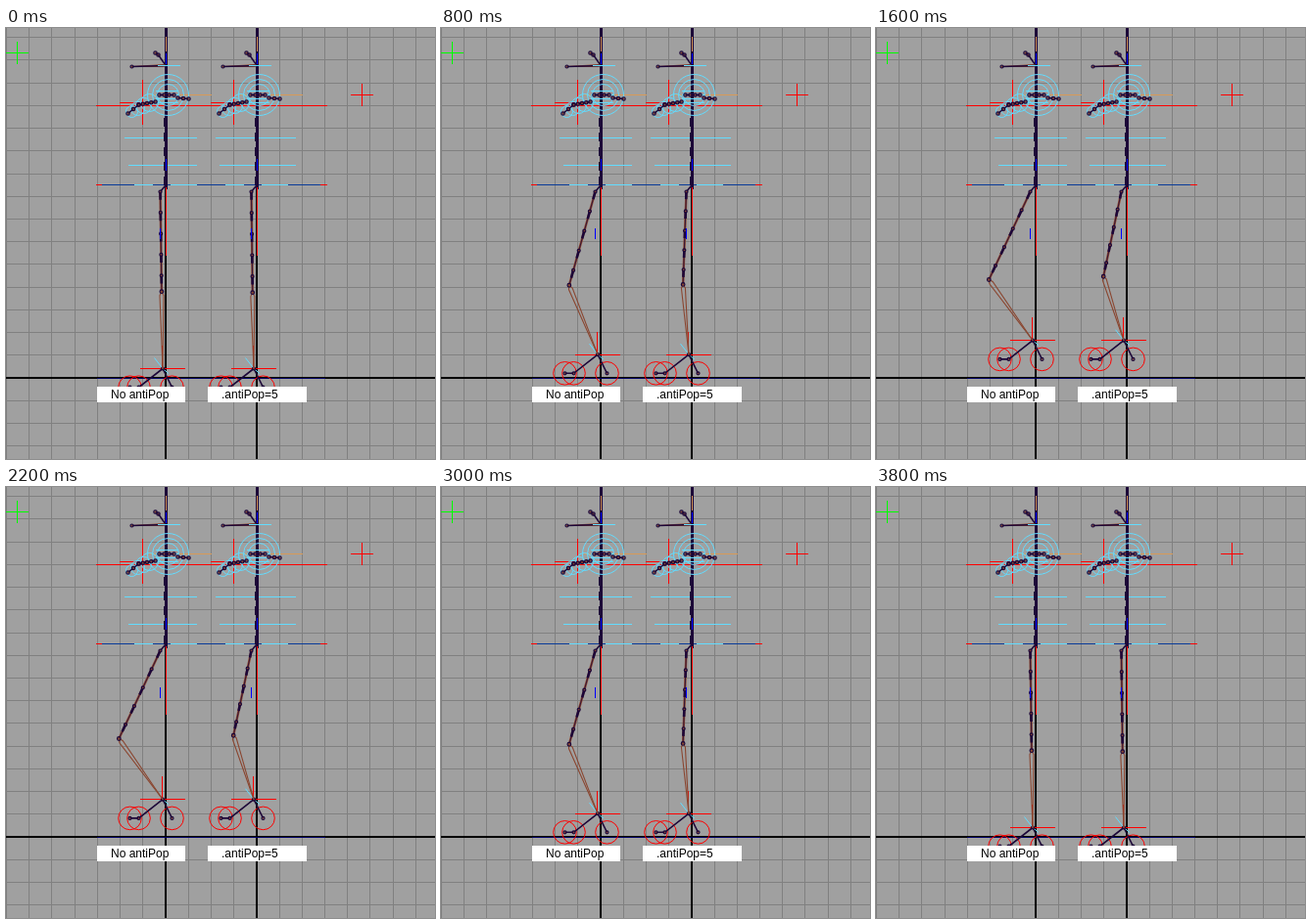
Write an HTML page with a canvas that moves like this. It is 438x441 px and loops after 4 s.

```html
<!DOCTYPE html>
<html lang="en">
<head>
<meta charset="utf-8">
<title>Leg IK comparison</title>
<style>
html, body { margin: 0; width: 100%; height: 100%; overflow: hidden; background: #a0a0a0; }
canvas { display: block; }
</style>
</head>
<body>
<canvas id="stage" width="438" height="441"></canvas>
<script>
const ctx = document.getElementById('stage').getContext('2d');
const W = 438, H = 441, STEP_MS = 200, STEPS = 20;
const SPINE_X = 163, GROUND_Y = 358, CELL = 23.22, RIG_GAP = 93;
const CYAN = '#62dcff', RED = '#ff0000', DARK = '#1c0638', BROWN = '#8a4630',
      NAVY = '#000064', TAN = '#d89a58', BLUE = '#0000ff';
const HIP = { x: 157, y: 167 }, THIGH = 99.4, SHANK = 76.6;

function rect(x, y, w, h, color) {
  ctx.fillStyle = color;
  ctx.fillRect(x, y, w, h);
}
const hline = (x1, x2, y, color) => rect(x1, y, x2 - x1, 1, color);
const vline = (x, y1, y2, color) => rect(x, y1, 1, y2 - y1, color);
const point = (x, y) => ({ x, y });
const mix = (a, b, f) => point(a.x + (b.x - a.x) * f, a.y + (b.y - a.y) * f);

function path(points, color, width = 1) {
  ctx.strokeStyle = color;
  ctx.lineWidth = width;
  ctx.beginPath();
  points.forEach(p => ctx.lineTo(p.x + 0.5, p.y + 0.5));
  ctx.stroke();
}

function ring(x, y, r, color, width = 1) {
  ctx.strokeStyle = color;
  ctx.lineWidth = width;
  ctx.beginPath();
  ctx.arc(x + 0.5, y + 0.5, r, 0, Math.PI * 2);
  ctx.stroke();
}

function joint(p, r = 1.5) {
  ctx.fillStyle = BROWN;
  ctx.beginPath();
  ctx.arc(p.x + 0.5, p.y + 0.5, r - 0.6, 0, Math.PI * 2);
  ctx.fill();
  ring(p.x, p.y, r, DARK, 1.2);
}

// A bone with evenly spaced joints along it.
function chain(from, to, count) {
  path([from, to], DARK, 1.6);
  for (let i = 0; i <= count; i++) joint(mix(from, to, i / count), 1.7);
}

// A thin bone: a pair of lines, widest just after its root.
function bone(from, to, halfWidth) {
  const len = Math.hypot(to.x - from.x, to.y - from.y);
  const nx = -(to.y - from.y) / len * halfWidth, ny = (to.x - from.x) / len * halfWidth;
  const neck = mix(from, to, 0.05);
  for (const side of [-1, 1]) {
    path([from, point(neck.x + nx * side, neck.y + ny * side), to], BROWN, 1.1);
  }
}

function cross(x, y, r, color) {
  hline(x - r, x + r + 1, y, color);
  vline(x, y - r, y + r + 1, color);
}

function drawScene() {
  rect(0, 0, W, H, '#a0a0a0');
  for (let x = SPINE_X % CELL; x < W; x += CELL) vline(Math.floor(x), 0, H, '#808080');
  for (let y = GROUND_Y % CELL; y < H; y += CELL) hline(0, W, Math.floor(y), '#808080');
  rect(0, GROUND_Y - 1, W, 2, '#000');
  for (let i = 0; i < 2; i++) rect(SPINE_X - 1 + i * RIG_GAP, 0, 2, H, '#000');
  hline(93, 326, GROUND_Y, NAVY);
  hline(92, 328, 79, RED);
  hline(92, 328, 160, RED);
  hline(98, 321, 160, '#0a3c98');
  cross(11, 25, 11, '#00ff00');
  cross(363, 68, 11, RED);
}

function drawTorso(spread) {
  hline(121, 195 + spread, 112, CYAN);
  hline(125, 195 + spread, 140, CYAN);
  hline(131, 150, 160, CYAN);
  hline(168, 195, 160, CYAN);

  rect(162, 0, 3, 165, DARK);
  for (let y = 92; y < 160; y += 15) rect(161, y, 4, 9, DARK);
  vline(SPINE_X, 9, 24, TAN);
  vline(SPINE_X, 26, 37, BLUE);
  vline(SPINE_X, 134, 146, BLUE);

  // head and jaw
  chain(point(152, 25), point(155, 27), 1);
  path([point(155, 27), point(162, 37)], DARK, 1.5);
  bone(point(162, 38), point(128, 39), 1);
  path([point(128, 39), point(162, 38)], DARK, 1.3);
  joint(point(128, 39));
  hline(155, 178, 38, CYAN);

  // shoulder and hand controls
  hline(146, 210, 68, TAN);
  hline(116, 146, 76, RED);
  vline(139, 53, 99, RED);
  for (let r = 11; r <= 21; r += 5) ring(165, 68, r, CYAN);
  for (let i = 0; i < 4; i++) ring(128 + i * 6, 85 - i * 3, 6 + i, CYAN);
  for (let y = 64; y <= 76; y += 4) hline(153, 176, y, CYAN);

  // arm
  const wrist = point(135, 78), elbow = point(152, 75);
  chain(point(124, 87), wrist, 2);
  chain(wrist, elbow, 4);
  chain(point(156, 68), point(171, 68), 3);
  chain(point(175, 71), point(186, 72), 2);
}

// Two-bone solve; the leg stretches straight when the ankle is out of reach.
function kneeHard(ankle) {
  const dx = ankle.x - HIP.x, dy = ankle.y - HIP.y, dist = Math.hypot(dx, dy);
  let along = dist * THIGH / (THIGH + SHANK), out = 0;
  if (dist < THIGH + SHANK) {
    along = (THIGH ** 2 + dist ** 2 - SHANK ** 2) / (2 * dist);
    out = Math.sqrt(THIGH ** 2 - along ** 2);
  }
  const ux = dx / dist, uy = dy / dist;
  return point(HIP.x + ux * along - uy * out, HIP.y + uy * along + ux * out);
}

// Softened bend that eases in before the leg is fully extended.
function kneeSoft(ankle, pose) {
  const straight = mix(HIP, ankle, 0.57);
  return point(straight.x - 4.1 * Math.log(1 + Math.exp(pose - 3.2)), straight.y);
}

function drawFoot(ankle) {
  const row = Math.round(ankle.y), sole = ankle.y + 19.2;
  const toe = point(126, sole), ball = point(135, sole), heel = point(169, sole);
  hline(137, 183, row, RED);
  vline(159, row - 23, row, RED);
  for (const p of [toe, ball, heel]) ring(p.x, p.y, 11.8, RED);
  path([point(151, ankle.y - 11), ankle, point(ankle.x + 6, ankle.y + 5)], CYAN);
  path([ankle, ball, toe], DARK, 1.6);
  path([ankle, heel], DARK, 1.5);
  for (const p of [toe, ball, heel, ankle]) joint(p);
}

function drawLeg(knee, ankle) {
  path([point(162, 161), HIP], DARK, 1.6);
  path([HIP, knee], BROWN, 2.4);
  path([HIP, knee], DARK, 0.8);
  for (let f = 0; f < 1; f += 0.21) {
    path([mix(HIP, knee, f), mix(HIP, knee, f + 0.08)], DARK, 2.6);
    joint(mix(HIP, knee, f));
  }
  bone(knee, ankle, 2);
  joint(knee, 1.8);
}

function drawRig(offset, soft, pose) {
  const ankle = point(159.5, 348 - 3.6 * pose);
  const knee = soft ? kneeSoft(ankle, pose) : kneeHard(ankle);
  ctx.save();
  ctx.translate(offset, 0);
  drawTorso(soft ? 8 : 0);
  vline(SPINE_X, 163, 233, RED);
  drawFoot(ankle);
  drawLeg(knee, ankle);
  vline(157, 205, 216, BLUE);
  ctx.restore();
}

function label(x, width, text) {
  rect(x, 367, width, 16, '#fff');
  ctx.fillStyle = '#000';
  ctx.font = '12px "Liberation Sans", Arial, sans-serif';
  ctx.fillText(text, x + 14, 379);
}

function render(time) {
  const step = Math.floor(time / STEP_MS) % STEPS;
  const pose = Math.min(step, STEPS - 1 - step);
  drawScene();
  drawRig(0, false, pose);
  drawRig(RIG_GAP, true, pose);
  label(93, 90, 'No antiPop');
  label(206, 101, '.antiPop=5');
}

const start = performance.now();
function tick() {
  render(performance.now() - start);
  requestAnimationFrame(tick);
}
tick();
</script>
</body>
</html>
```
